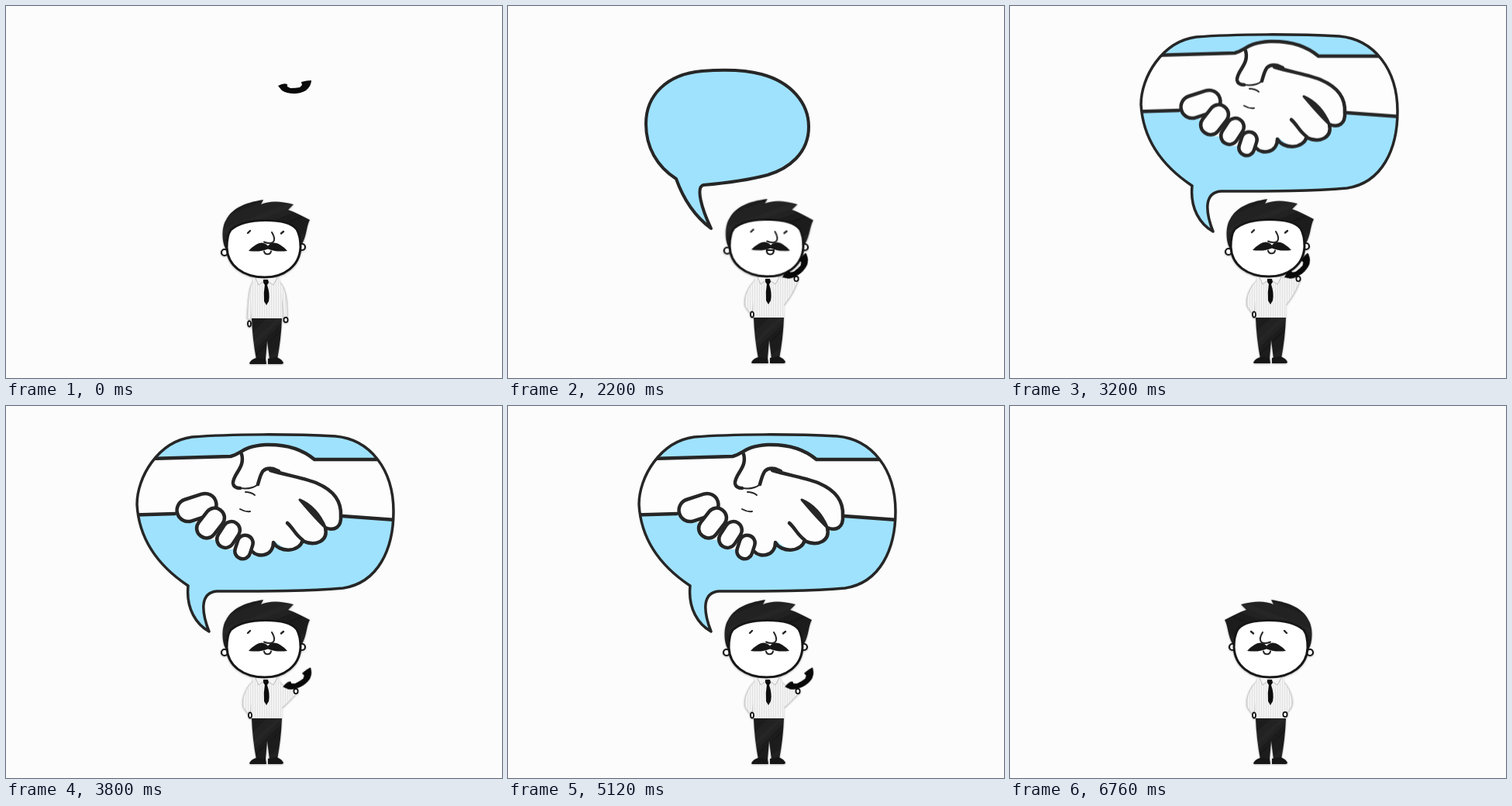
An HTML page for the animation above (7.12 s loop, 640 by 480 pixels).

```html
<!DOCTYPE html>
<html lang="en">
<head>
<meta charset="utf-8">
<title>Phone call handshake</title>
<style>
html, body { margin: 0; width: 100%; height: 100%; overflow: hidden; background: #fcfcfc; }
svg { display: block; width: 640px; height: 480px; }

:root {
  --small: path("M262 287C246 275 228 254 217 223C192 207 178 182 178 152C178 115 205 88 250 84C275 82 305 82 327 88C365 98 388 125 388 156C388 190 362 210 335 218C305 226 275 229 252 231C242 234 250 262 262 287Z");
  --big: path("M262 291C246 282 232 262 235 232C205 212 172 180 169 127C169 92 196 46 240 40C290 36 370 36 425 39C470 43 500 82 500 136C500 185 480 228 435 235C390 239 340 239 272 239C250 241 252 265 262 291Z");
  --l-down: path("M320 354C313 362 313 378 311 403L316 405C317 392 317 382 318 372Z");
  --l-hip: path("M320 354C309 362 302 382 307 390L313 398C317 396 315 388 318 380Z");
  --r-down: path("M351 354C361 362 363 378 363 400L358 402C358 390 356 382 355 372Z");
  --r-out: path("M351 354C357 361 362 364 369 364L375 371C368 378 361 386 355 390Z");
  --r-ear: path("M351 352C355 352 358 350 360 348L374 355C370 368 362 380 355 388Z");
  --r-hip: path("M351 354C361 362 368 382 362 390L356 398C352 396 355 388 353 380Z");
}

/* every part shares one 7.12 s loop */
.shape, .balloon, .left, .right, .clasp, .open-hand, .phone, .head, .face-turn,
.man, .arm-l, .arm-r, .hand-l, .hand-r, .eyes, .lids, .talk {
  animation: 7.12s linear infinite;
}
.ink { fill: none; stroke: #262626; stroke-linecap: round; stroke-linejoin: round; }
.skin { fill: #fdfdfd; stroke: none; }
.fade { stroke-width: 2; }

.shape { d: var(--small); animation-name: shape; }
@keyframes shape {
  0%, 31.46% { d: var(--small); stroke-width: 4px; }
  33.15%, 78.65% { d: var(--big); stroke-width: 3.5px; }
  80.34%, 100% { d: var(--small); stroke-width: 4px; }
}
.balloon { transform-origin: 262px 289px; animation-name: balloon; }
@keyframes balloon {
  0%, 24.71% { transform: scale(0); visibility: hidden; }
  24.72% { transform: scale(.08); visibility: visible; }
  29.78%, 31.46% { transform: scale(1); }
  33.15% { transform: scale(1.01); }
  34.27%, 77.5% { transform: scale(1); }
  78.65% { transform: scale(1.01); }
  80.34%, 82.02% { transform: scale(1); visibility: visible; }
  87.06% { transform: scale(.04); visibility: visible; }
  87.08%, 100% { transform: scale(0); visibility: hidden; }
}
.left { animation-name: reach-l; }
@keyframes reach-l {
  0%, 32.6% { transform: translateX(-190px); animation-timing-function: ease-out; }
  38.2% { transform: none; }
  40.45%, 100% { transform: translateX(10px); }
}
.right { animation-name: reach-r; }
@keyframes reach-r {
  0%, 32.6% { transform: translateX(190px); animation-timing-function: ease-out; }
  38.2% { transform: none; }
  40.45%, 100% { transform: translateX(-10px); }
}
.open-hand { animation-name: part; animation-timing-function: step-end; }
@keyframes part { 0% { opacity: 1; } 40.45%, 100% { opacity: 0; } }
.clasp { animation-name: shake; animation-timing-function: ease-in-out; }
@keyframes shake {
  0%, 40.44% { opacity: 0; transform: none; }
  40.45% { opacity: 1; transform: none; }
  42.13% { transform: translateY(6px); }
  44.38% { transform: translateY(-6px); }
  46.63% { transform: translateY(6px); }
  48.88% { transform: translateY(-4px); }
  51.12%, 100% { opacity: 1; transform: none; }
}

.phone { animation-name: phone; }
@keyframes phone {
  0%, 1.12% { transform: translate(372px, 105px); animation-timing-function: cubic-bezier(.4, .25, .8, .7); }
  5.06% { transform: translate(380px, 354px) rotate(-13deg); }
  5.62% { transform: translate(381px, 360px) rotate(-11deg); }
  6.18%, 8.99% { transform: translate(381px, 357px) rotate(-13deg); animation-timing-function: ease-in-out; }
  13.48%, 44.94% { transform: translate(372px, 339px) rotate(-37deg); animation-timing-function: ease-in-out; }
  49.44%, 78.65% { transform: translate(377px, 355px) rotate(-26deg); }
  80.34%, 89.33% { transform: translate(381px, 357px) rotate(-13deg); }
  91.01% { transform: translate(376px, 364px) rotate(-22deg); animation-timing-function: ease-out; }
  92.7% { transform: translate(505px, 242px) rotate(70deg); animation-timing-function: ease-in; }
  94.94%, 100% { transform: translate(690px, 262px) rotate(250deg); }
}
.arm-l { d: var(--l-hip); animation-name: arm-l; }
@keyframes arm-l { 0%, 2.81% { d: var(--l-down); } 5.06%, 100% { d: var(--l-hip); } }
.hand-l { animation-name: hand-l; }
@keyframes hand-l {
  0%, 2.81% { transform: translate(314px, 410px); }
  5.06%, 100% { transform: translate(315px, 399px); }
}
.arm-r { d: var(--r-out); animation-name: arm-r; }
@keyframes arm-r {
  0%, 2.81% { d: var(--r-down); }
  5.06%, 8.99% { d: var(--r-out); animation-timing-function: ease-in-out; }
  13.48%, 44.94% { d: var(--r-ear); animation-timing-function: ease-in-out; }
  49.44%, 91.57% { d: var(--r-out); }
  94.38%, 100% { d: var(--r-hip); }
}
.hand-r { animation-name: hand-r; }
@keyframes hand-r {
  0%, 2.81% { transform: translate(361px, 405px); }
  5.06%, 8.99% { transform: translate(374px, 368px); animation-timing-function: ease-in-out; }
  13.48%, 44.94% { transform: translate(372px, 353px); animation-timing-function: ease-in-out; }
  49.44%, 91.57% { transform: translate(374px, 368px); }
  94.38%, 100% { transform: translate(355px, 398px); }
}
.man { transform-origin: 335px 463px; animation-name: squash; }
@keyframes squash {
  0%, 4.49%, 6.18%, 8.99%, 49.44%, 89.89%, 92.7%, 100% { transform: none; }
  5.34%, 91.01% { transform: scaleY(.985); }
  13.48%, 44.94% { transform: translateY(-1px); }
}
.head { transform-origin: 335px 350px; animation-name: nod; }
@keyframes nod {
  0%, 18.54%, 22.47%, 24.72%, 28.65%, 33.15%, 100% { transform: none; }
  20.22%, 26.4%, 30.34%, 31.46% { transform: rotate(1.5deg); }
}
.face-turn { transform-origin: 334.5px 350px; animation-name: turn; animation-timing-function: step-end; }
@keyframes turn { 0% { transform: none; } 93.26%, 100% { transform: scaleX(-1); } }
.talk { animation-name: talk; animation-timing-function: step-end; }
@keyframes talk {
  0%, 21.35%, 27.53%, 32.6%, 100% { opacity: 0; }
  18.54%, 25.28%, 29.21% { opacity: 1; }
}
.eyes { animation-name: look; animation-timing-function: step-end; }
@keyframes look { 0%, 85.96%, 100% { opacity: 1; } 79.21% { opacity: 0; } }
.lids { animation-name: blink; animation-timing-function: step-end; }
@keyframes blink { 0%, 85.96%, 100% { opacity: 0; } 79.21% { opacity: 1; } }
</style>
</head>
<body>
<svg viewBox="0 0 640 480">
  <defs>
    <clipPath id="inside"><path class="shape"/></clipPath>
    <pattern id="stripes" width="3" height="8" patternUnits="userSpaceOnUse">
      <path fill="#f3f3f3" d="M0 0h3v8H0z"/><path fill="#e2e2e2" d="M0 0h1v8H0z"/>
    </pattern>
    <linearGradient id="cloth" x2=".7" y2="1">
      <stop stop-color="#181818"/><stop offset=".45" stop-color="#262626"/>
      <stop offset=".65" stop-color="#191919"/><stop offset="1" stop-color="#222"/>
    </linearGradient>
    <filter id="soft" x="-10%" y="-10%" width="120%" height="120%">
      <feDropShadow dx="0" dy=".6" stdDeviation="1" flood-opacity=".35"/>
    </filter>
  </defs>

  <g class="balloon">
    <path class="shape" fill="#9fe2fe"/>
    <g clip-path="url(#inside)">
      <g class="open-hand">
        <g class="right" stroke-width="4.5">
          <path class="skin" d="M720 82H490C470 65 430 63 405 71C380 76 368 78 370 90C374 98 385 98 400 97C375 101 322 104 318 118L325 187H360C335 188 328 205 345 208C370 212 400 214 430 210C460 205 475 193 490 183H720Z"/>
          <path fill="#9fe2fe" d="M322 122L385 134L326 137Z"/>
          <path class="ink" d="M720 82H490C470 65 430 63 405 71C380 76 368 78 370 90C374 98 385 98 400 97L430 98M400 98L345 105C330 108 320 111 318 118M325 124Q350 132 387 134L325 136M335 162L393 164M325 187L408 185M360 187C335 188 328 205 345 208C370 212 400 214 430 210C460 205 475 193 490 183H720"/>
          <path class="ink fade" d="M444 104Q457 109 470 102"/>
        </g>
        <g class="left" stroke-width="4.5">
          <path class="skin" d="M-50 75H180C205 62 235 66 262 83C275 88 288 92 287 102C283 113 275 113 268 112L320 115C332 118 332 135 320 138C345 140 348 160 330 165C333 172 330 190 315 191L300 196C308 205 300 212 290 213C270 214 230 207 199 204H-50Z"/>
          <path class="ink" d="M-50 75H180C205 62 235 66 262 83C275 88 288 92 287 102C283 113 270 113 262 110C250 105 242 101 230 99M275 113L318 116C332 118 332 136 320 138Q290 143 248 137M322 139C345 140 348 162 330 166Q295 170 248 165M325 168C333 176 328 191 315 192C290 195 262 190 233 187M233 187C260 194 280 196 297 195C308 202 300 212 290 213C270 214 230 207 199 204H-50"/>
          <path class="ink fade" d="M207 133Q213 132 219 135M202 153Q207 156 214 156M197 176Q203 179 210 179"/>
        </g>
      </g>

      <g class="clasp" stroke-width="4.5">
        <path class="skin" d="M150 69L294 64C303 60 305 52 335 50C365 49 385 58 398 69H530V149L434 142C433 152 428 158 416 160C412 175 400 180 384 175C380 186 362 190 347 174C345 190 332 195 320 188C316 198 300 201 295 184C287 187 272 184 272 172C262 174 245 170 245 150L219 139L150 142Z"/>
        <path class="ink" d="M150 69L290 65C305 61 305 52 335 50C365 49 385 58 398 69H530M150 141L218 139M434 142L530 149"/>
        <path class="ink" d="M304 62C309 80 292 88 293 100Q294 106 302 106M325 101C329 88 330 78 345 81L352 84M341 83C365 90 390 94 402 100C425 110 433 125 432 142"/>
        <path class="ink fade" d="M302 106Q318 108 325 101M309 111Q316 111 321 115M302 133Q309 137 315 136"/>
        <path class="ink" d="M318 188C325 196 345 194 345 176C352 189 378 190 383 173C373 166 371 158 363 151M383 174C400 182 416 174 412 157C424 162 433 156 432 142"/>
        <path class="ink" fill="#262626" style="fill:#262626" stroke-width="3" d="M379 121Q401 130 413 158Q400 146 379 121Z"/>
        <g fill="#fdfdfd" stroke="#262626">
          <rect x="-26" y="-14.500" width="52" height="29" rx="14.500" transform="translate(246 131) rotate(-18)"/>
          <rect x="-21" y="-12.500" width="42" height="25" rx="12" transform="translate(264 151) rotate(-52)"/>
          <rect x="-18" y="-11" width="36" height="22" rx="11" transform="translate(287 166) rotate(-57)"/>
          <rect x="-15.500" y="-10" width="31" height="20" rx="10" transform="translate(307 182) rotate(-72)"/>
        </g>
      </g>
    </g>
    <path class="shape ink"/>
  </g>

  <g class="man" filter="url(#soft)">
    <g fill="url(#stripes)" stroke="#c4c4c4" stroke-width=".9">
      <path class="arm-l"/>
      <path class="arm-r"/>
      <path stroke="none" d="M319 351H352Q357 365 356 404H317Q315 370 319 351Z"/>
    </g>
    <path fill="url(#cloth)" d="M317 403H356Q355 430 350 456H340L337 432L335 456H323Q318 430 317 403Z"/>
    <path fill="#171717" d="M314 461Q316 456 323 454L335 455L336 462H315ZM338 462V455L349 453Q357 456 358 461L356 462Z"/>
    <path fill="#f4f4f4" stroke="#bbb" d="M322 351L326 360L335 353L345 360L350 351"/>
    <path fill="#0c0c0c" d="M332 353H338L339 357L337 360Q341 372 339 381L336 386L333 381Q332 370 334 360L332 357Z"/>
    <g fill="#fff" stroke="#111" stroke-width="1.8">
      <ellipse class="hand-l" rx="2" ry="3.6"/>
      <ellipse class="hand-r" rx="2.6" ry="3.2"/>
    </g>

    <g class="head"><g class="face-turn">
      <g fill="#fff" stroke="#181818" stroke-width="2.2">
        <circle cx="282" cy="318" r="4"/><circle cx="382" cy="311" r="4"/>
      </g>
      <path fill="url(#cloth)" d="M284 314C278 305 278 285 284 276C292 261 307 254 332 250L329 256Q345 249 371 256L364 263C373 266 382 271 392 276C388 282 388 297 382 307Z"/>
      <path fill="#fff" stroke="#181818" stroke-width="3" d="M290 289C300 280 318 276.500 335 276.500C352 276.500 368 279 375 288C379 295 380 302 380 311C379 336 358 350 334 350C306 350 286 335 285 312C285 302 286 294 290 289Z"/>
      <path class="ink eyes" stroke-width="2.4" d="M312 293L315 290M355 293.500L358 291"/>
      <path class="ink lids" stroke-width="2" d="M312 293Q316 291 320 292.500M352 293.500Q356 292 359 293"/>
      <path class="ink" stroke-width="2" d="M343 292C348 300 347 306 340 306Q336 306 333 304.500"/>
      <path class="ink" stroke-width="2" d="M333 316.500C334 321.500 341 321.500 342 316.500"/>
      <path class="talk" fill="#fff" stroke="#181818" stroke-width="2" d="M333 316H342Q342 321.500 337.500 321.500T333 316Z"/>
      <path fill="#181818" d="M313 316Q322 306 330 305.500Q335 306 338 309.500Q341 305.500 346 305.500Q354 306 363 316Q348 318 338 313.500Q328 318 313 316Z"/>
    </g></g>
  </g>

  <path class="phone" fill="#090909" d="M-21 -2Q-14 -6 -9 -4L-9 -1L-5 1Q2 1 7 0L10 -3L9 -7Q16 -9 22 -9Q22 -2 15 4Q8 8 0 8Q-10 8 -16 4Z"/>
</svg>
</body>
</html>
```
